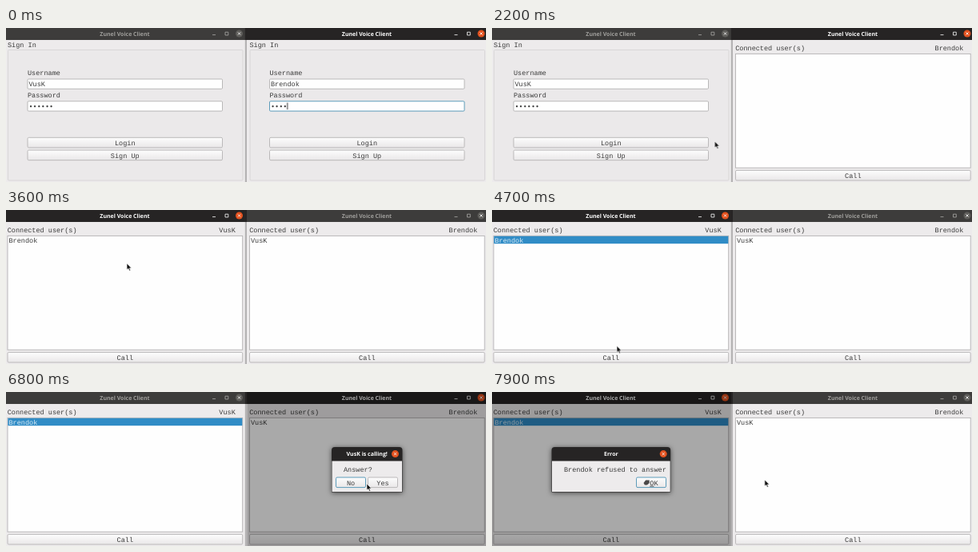
Animation of 600 by 193 pixels, one loop 8 s. Source, as an HTML page:

```html
<!DOCTYPE html>
<html lang="en">
<head>
<meta charset="utf-8">
<title>Voice client demo</title>
<style>
  html, body { margin: 0; width: 100%; height: 100%; overflow: hidden; background: #edebec; }
  svg { display: block; width: 100%; height: 100%; }
  text { font: 8.53px "Liberation Mono", monospace; fill: #3a3a3a; text-rendering: geometricPrecision; white-space: pre; }
  .title { font: bold 7px "Open Sans", sans-serif; text-anchor: middle; }
  .mid { text-anchor: middle; }
  .end { text-anchor: end; }

  .bar { fill: #3d3c3b; }
  .inactive .title { fill: #a09f9c; }
  .inactive .icon { stroke: #a09f9c; }
  .inactive .close { fill: #5f5e5b; }
  .active .bar { fill: #262424; }
  .active .title { fill: #fff; }
  .active .icon { stroke: #e8e8e8; }
  .active .close { fill: #e4521f; }
  .icon, .cross { fill: none; stroke-width: .9; }
  .cross { stroke: #f4f4f4; }

  .panel { fill: #edebec; }
  .frame { fill: #ebe9ea; stroke: #d3d1d2; stroke-width: .8; }
  .field { fill: #fefefe; stroke: #b3b1b2; stroke-width: .9; }
  .focus { stroke: #4c92b4; }
  .button { fill: url(#shine); stroke: #b5b3b4; stroke-width: .9; }
  .button.focus { stroke: #4c92b4; }
  .row { fill: #308cc6; }
  .selected text { fill: #dcecf6; }
  .shadow { filter: drop-shadow(0 1px 3px rgba(0, 0, 0, .6)); }
  .dim { fill: #000; opacity: 0; }

  /* Every part shares one 8 s clock. */
  .step { animation: 8s step-end infinite; }
  .left-active  { animation-name: left-active; }
  .right-active { animation-name: right-active; }
  .left-login   { animation-name: left-login; }
  .left-list    { animation-name: left-list; }
  .right-login  { animation-name: right-login; }
  .right-list   { animation-name: right-list; }
  .selected     { animation-name: selected; }
  .call         { animation-name: call; }
  .error        { animation-name: error; }
  .key5         { animation-name: key5; }
  .key6         { animation-name: key6; }
  .caret        { animation-name: caret; }
  .left-dim     { animation: left-dim 8s linear infinite; }
  .right-dim    { animation: right-dim 8s linear infinite; }
  .cursor       { animation: cursor 8s linear infinite; }

  @keyframes left-active  { 0% { visibility: hidden } 33.6% { visibility: visible } 66.1% { visibility: hidden } 89.3%, 100% { visibility: visible } }
  @keyframes right-active { 0% { visibility: visible } 33.6% { visibility: hidden } 66.1% { visibility: visible } 89.3%, 100% { visibility: hidden } }
  @keyframes left-login   { 0% { visibility: visible } 34.9%, 100% { visibility: hidden } }
  @keyframes left-list    { 0% { visibility: hidden } 34.9%, 100% { visibility: visible } }
  @keyframes right-login  { 0% { visibility: visible } 14.9%, 100% { visibility: hidden } }
  @keyframes right-list   { 0% { visibility: hidden } 14.9%, 100% { visibility: visible } }
  @keyframes selected     { 0% { visibility: hidden } 52.4%, 100% { visibility: visible } }
  @keyframes call         { 0% { visibility: hidden } 66.1% { visibility: visible } 89.3%, 100% { visibility: hidden } }
  @keyframes error        { 0% { visibility: hidden } 89.3%, 100% { visibility: visible } }
  @keyframes key5         { 0% { visibility: hidden } 1.2% { visibility: visible } 14.9%, 100% { visibility: hidden } }
  @keyframes key6         { 0% { visibility: hidden } 3.7% { visibility: visible } 14.9%, 100% { visibility: hidden } }
  @keyframes caret {
    0% { transform: none; visibility: visible }
    1.2% { transform: translateX(5.12px); visibility: visible }
    3.7% { transform: translateX(10.24px); visibility: visible }
    12.4%, 100% { transform: translateX(10.24px); visibility: hidden }
  }
  @keyframes left-dim  { 0%, 90% { opacity: 0 } 96.25%, 100% { opacity: .337 } }
  @keyframes right-dim { 0%, 67.1% { opacity: 0 } 73.4%, 89.7% { opacity: .337 } 92.8%, 100% { opacity: 0 } }
  @keyframes cursor {
    0%, 4.9% { transform: translate(400px, 99px); visibility: hidden }
    5% { transform: translate(400px, 99px); visibility: visible; animation-timing-function: ease-in-out }
    11.2% { transform: translate(511px, 142px) }
    22% { transform: translate(511px, 142px); animation-timing-function: ease-in }
    27.5% { transform: translate(279px, 142px); animation-timing-function: ease-out }
    32.5% { transform: translate(146px, 143px) }
    38% { transform: translate(146px, 143px); animation-timing-function: ease-in }
    45% { transform: translate(151px, 67px); animation-timing-function: ease-out }
    49.5% { transform: translate(152px, 39px) }
    52.5% { transform: translate(152px, 39px); animation-timing-function: ease-in-out }
    58.7% { transform: translate(156px, 170px) }
    61.2%, 62% { transform: translate(157px, 183px) }
    72% { transform: translate(157px, 183px); animation-timing-function: ease-in-out }
    82.5%, 85% { transform: translate(451px, 115px) }
    87.5%, 92.5% { transform: translate(443px, 114px) }
    98.75% { transform: translate(341px, 110px) }
    100% { transform: translate(322px, 109px); visibility: visible }
  }
</style>
</head>
<body>
<svg id="stage" viewBox="0 0 600 193" preserveAspectRatio="none"></svg>
<script>
  const APP = 'Zunel Voice Client';
  const LEFT_USER = 'VusK';
  const RIGHT_USER = 'Brendok';
  const RIGHT_X = 302.5;

  const text = (x, y, value, cls = '') => `<text x="${x}" y="${y}" class="${cls}">${value}</text>`;
  const rect = (x, y, w, h, cls, r = 0) =>
    `<rect x="${x}" y="${y}" width="${w}" height="${h}" rx="${r}" class="${cls}"/>`;
  const group = (cls, ...parts) => `<g class="${cls}">${parts.join('')}</g>`;

  const button = (x, y, w, label, cls = '') =>
    rect(x, y, w, 12.6, `button ${cls}`, 1.5) + text(x + w / 2, y + 9.7, label, 'mid');

  const closeButton = (x, y) =>
    `<circle cx="${x}" cy="${y}" r="4.5" class="close"/>
     <path d="M${x - 1.6} ${y - 1.6}l3.2 3.2m0 -3.2l-3.2 3.2" class="cross"/>`;

  const titleBar = cls => group(cls,
    rect(-1.5, 0, 300.3, 15, 'bar'),
    text(148.5, 9.8, APP, 'title'),
    '<path d="M258 8.6h4M274 5.2h3.8v3.8h-3.8z" class="icon"/>',
    closeButton(291.5, 7));

  const loginPage = (user, typing) => [
    text(2, 24, 'Sign In'),
    rect(2.5, 27.5, 293.5, 163.5, 'frame', 1),
    text(27, 59, 'Username'),
    rect(27, 64, 243.5, 12.3, 'field', 1.2),
    text(28.5, 73, user),
    text(27, 87, 'Password'),
    rect(27, 91.8, 243.5, 12.3, `field ${typing ? 'focus' : ''}`, 1.2),
    text(28.5, 101, typing ? '••••' : '••••••'),
    typing ? text(48.98, 101, '•', 'step key5') + text(54.1, 101, '•', 'step key6') +
      rect(48.8, 93.6, .8, 8.6, 'step caret') : '',
    button(27, 137.3, 243.5, 'Login'),
    button(27, 153.1, 243.5, 'Sign Up'),
  ].join('');

  const listPage = (user, rows) => [
    text(1.7, 28, 'Connected user(s)'),
    text(286.8, 28, user, 'end'),
    rect(2, 32.4, 293.7, 142.8, 'field'),
    rows,
    button(2, 178.4, 293.7, 'Call'),
  ].join('');

  const appWindow = (side, x, login, list) => `<g transform="translate(${x})">
    ${rect(-1.5, 15, 300.3, 178, 'panel')}
    ${group(`step ${side}-login`, login)}
    ${group(`step ${side}-list`, list)}
    ${titleBar('inactive')}
    ${titleBar(`active step ${side}-active`)}
    ${rect(-1.5, 0, 300.3, 193, `dim ${side}-dim`)}
  </g>`;

  const dialog = (cls, x, w, title, ...body) => group(`step active ${cls}`,
    `<g class="shadow">
       <path d="M${x} 125.5V73q0 -4 4 -4h${w - 8}q4 0 4 4v52.5z" class="bar"/>
     </g>`,
    rect(x + .5, 86.5, w - 1, 38.5, 'panel'),
    text(x + w / 2, 80.3, title, 'title'),
    closeButton(x + w - 9, 77.6),
    ...body);

  const leftRows = text(3.5, 40.8, RIGHT_USER) +
    group('step selected', rect(2.4, 32.8, 292.9, 9.4, 'row'), text(3.5, 40.8, RIGHT_USER));
  const rightRows = group('step left-list', text(3.5, 40.8, LEFT_USER));

  document.getElementById('stage').innerHTML = `
    <defs>
      <linearGradient id="shine" x2="0" y2="1">
        <stop stop-color="#fdfdfd"/><stop offset="1" stop-color="#e9e7e8"/>
      </linearGradient>
    </defs>
    <rect width="600" height="193" fill="#b4b2b3"/>
    <rect width="600" height="15" fill="#262424"/>
    ${appWindow('left', 0, loginPage(LEFT_USER, false), listPage(LEFT_USER, leftRows))}
    ${appWindow('right', RIGHT_X, loginPage(RIGHT_USER, true), listPage(RIGHT_USER, rightRows))}
    ${dialog('call', 407, 88.5, `${LEFT_USER} is calling!`,
      text(422, 100, 'Answer?'),
      button(412.5, 107, 37, 'No', 'focus'),
      button(452.5, 107, 37, 'Yes'))}
    ${dialog('error', 74.5, 148.7, 'Error',
      text(90, 100, `${RIGHT_USER} refused to answer`),
      button(180.5, 107, 37, '', 'focus'),
      '<path d="M189.5 114l2.6 -3.6h4.6v3.6l-2.8 2.6h-3z" fill="#4a4848"/>',
      text(197.3, 116.7, '<tspan text-decoration="underline">O</tspan>K'))}
    <g class="cursor">
      <path d="M0 0v8l1.9 -1.6l1.3 2.9l1.4 -.6l-1.3 -2.8h2.5z" fill="#111" stroke="#fff" stroke-width=".6"/>
    </g>`;
</script>
</body>
</html>
```
